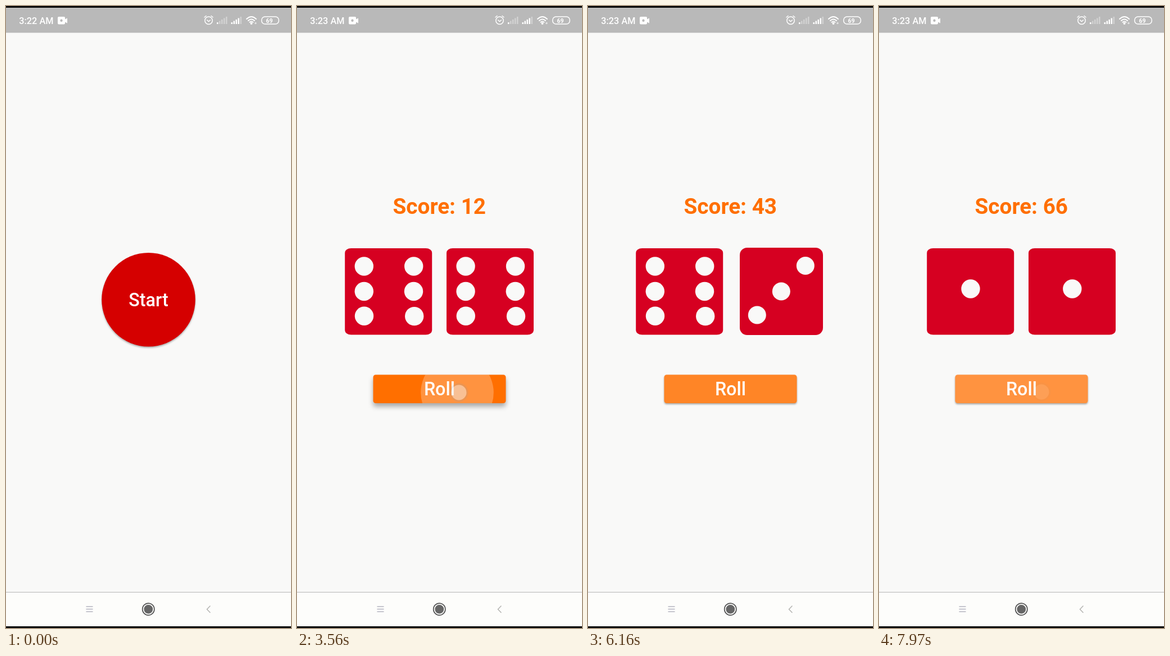
Recreate the animation shown at these times as an HTML page. Size 507 by 1104 pixels, loop 7990 ms.

```html
<!DOCTYPE html>
<html lang="en">
<head>
<meta charset="utf-8">
<title>Dice game</title>
<style>
  html, body { margin: 0; width: 100%; height: 100%; overflow: hidden; background: #f9f9f8; }
  svg { display: block; width: 507px; height: 1104px; font-family: Roboto, sans-serif; font-weight: 500; }
  .label { font-size: 32.3px; fill: #fff; text-anchor: middle; }
  .line { fill: none; stroke-width: 1.5; stroke-linecap: round; }
</style>
</head>
<body>
<svg viewBox="0 0 507 1104">
  <defs><clipPath id="buttonClip"><rect x="135.5" y="654.5" width="236" height="50.5" rx="4.5"/></clipPath></defs>
  <rect width="507" height="1104" fill="#f9f9f8"/>

  <g id="startPage">
    <circle id="startButton" cx="253.5" cy="521.3" r="83.3" fill="#d50000"/>
    <text class="label" x="253.5" y="532.5">Start</text>
  </g>

  <g id="gamePage">
    <rect y="47" width="507" height="994" fill="#f9f9f8"/>
    <text id="score" x="253.3" y="369" font-size="38.7" font-weight="700" fill="#ff6f00" text-anchor="middle"></text>
    <g id="leftDie"></g>
    <g id="rightDie" transform="translate(180.8 0)"></g>
    <rect id="rollButton" x="135.5" y="654.5" width="236" height="50.5" rx="4.5" fill="#ff6f00"/>
    <circle id="ripple" fill="#fff" clip-path="url(#buttonClip)"/>
    <text class="label" x="253.5" y="690.5">Roll</text>
  </g>

  <g id="touch">
    <circle r="16.5" fill="#a89a90" opacity=".32"/>
    <circle r="13.5" fill="#fff" opacity=".6"/>
  </g>

  <!-- status bar -->
  <rect width="507" height="47.5" fill="#b9b9b9"/>
  <rect width="507" height="3"/>
  <text id="clock" x="23.3" y="31.7" font-size="16.3" fill="#fff"></text>
  <g fill="#fff">
    <path d="M94 19h9q2 0 2 2v2.5l4-2v9l-4-2v2q0 2-2 2h-9q-2 0-2-2v-9.5q0-2 2-2z"/>
    <circle cx="98.5" cy="25.7" r="2.2" fill="#b9b9b9"/>
    <g id="signals"></g>
    <circle cx="436.5" cy="31" r="2"/>
    <circle cx="444" cy="30.5" r="1.7" opacity=".6"/>
    <text x="468.5" y="29.5" font-size="10.5" font-weight="700" text-anchor="middle">69</text>
  </g>
  <g class="line" stroke="#fff">
    <circle cx="360.5" cy="25.7" r="6.7"/>
    <path d="M357.5 25l3 2.5 3-2.5M353 20l3-2.5M368 20l-3-2.5"/>
    <path d="M428 23q8.5-8 17 0M431 26q5.5-5 11 0M433.5 28.800q3-2.5 6 0" stroke-width="2"/>
    <rect x="454.7" y="19" width="30.6" height="13" rx="6"/>
  </g>

  <!-- navigation bar -->
  <rect y="1041" width="507" height="60" fill="#fdfdfb"/>
  <rect y="1040" width="507" height="1" fill="#b5b5b5"/>
  <rect y="1101" width="507" height="3"/>
  <path class="line" stroke="#b4b4c0" d="M143 1066h11M143 1070.5h11M143 1075h11"/>
  <circle cx="253.3" cy="1070.7" r="10.6" fill="none" stroke="#555" stroke-width="1.7"/>
  <circle cx="253.3" cy="1070.7" r="7.9" fill="#666"/>
  <path class="line" stroke="#b4b4b0" d="M363 1065l-5.5 5.7 5.5 5.7"/>
</svg>

<script>
const LOOP = 7990, UP = 140;
const $ = id => document.getElementById(id);
const clamp = v => Math.max(0, Math.min(1, v));
const span = (t, from, to) => clamp((t - from) / (to - from));

// [touch down time, x, y, left die, right die]
const rolls = [
  [3350, 288, 686, 6, 6], [4250, 288, 687, 2, 6], [4820, 289, 686, 2, 2],
  [5280, 290, 686, 4, 6], [5780, 291, 685, 6, 3], [6240, 292, 685, 5, 4],
  [6740, 293, 685, 1, 3], [7220, 295, 685, 3, 5], [7680, 289, 685, 1, 1]
];

function die(n) {
  if (!n) return '';
  const wide = n === 1 || n === 6;
  const body = wide
    ? '<rect x="85.2" y="430" width="155" height="153.5" rx="11" ry="8"'
    : '<rect x="89.2" y="429" width="148" height="155" rx="13"';
  const pips = [];
  if (n === 1) pips.push([0, 502]);
  else if (n === 6) {
    pips.push([-43.7, 462], [-43.7, 506.5], [-43.5, 550.2]);
    pips.push([44.7, 462], [44.5, 506.5], [45.7, 550.6]);
  } else {
    pips.push([43, 461], [-43, 548.5]);
    if (n > 3) pips.push([-43, 461], [43, 548.5]);
    if (n % 2) pips.push([0, 506.5]);
  }
  return body + ' fill="#d60021"/>' + pips.map(([x, y]) =>
    `<circle cx="${163 + x}" cy="${y}" r="${wide ? 16.7 : 16}" fill="#f9f9f8"/>`).join('');
}

function lift(el, amount) {
  el.style.filter = `drop-shadow(0 ${2 + 5.5 * amount}px ${1.5 + 3.5 * amount}px rgba(0,0,0,.32))`;
}

function showTouch(x, y, age, up) {
  $('touch').setAttribute('transform', `translate(${x} ${y})`);
  $('touch').setAttribute('opacity', age < 0 ? 0 : 1 - span(age, up + 20, up + 180));
}

function draw(t) {
  const slide = 1 - (1 - span(t, 2650, 2890)) ** 3;
  $('startPage').setAttribute('transform', `translate(${-120 * slide} 0)`);
  $('gamePage').setAttribute('transform', `translate(${507 * (1 - slide)} 0)`);
  $('clock').textContent = t < 2890 ? '3:22 AM' : '3:23 AM';

  let score = 0, left = 1, right = 1, tap = null;
  for (const roll of rolls) {
    const age = t - roll[0];
    if (age < 0) break;
    tap = roll;
    if (age < UP) continue;
    score += roll[3] + roll[4];
    left = age < UP + 60 ? 0 : roll[3];
    right = roll[4];
  }
  $('score').textContent = 'Score: ' + score;
  $('leftDie').innerHTML = die(left);
  $('rightDie').innerHTML = die(right);

  const [down, x, y] = tap || [LOOP, 0, 0];
  const age = t - down;
  const ripple = $('ripple');
  ripple.setAttribute('cx', x - 3);
  ripple.setAttribute('cy', y);
  ripple.setAttribute('r', 165 * span(age, 140, 300) ** 1.15);
  ripple.setAttribute('opacity', .25 * (1 - span(age, 300, 500)));
  lift($('rollButton'), span(age, 60, 160) * (1 - span(age, 190, 280)));
  lift($('startButton'), span(t, 2560, 2640));
  if (tap) showTouch(x, y, age, UP);
  else showTouch(262, 530, t - 2550, 80);
}

$('signals').innerHTML = [375, 400.5].map((x, card) => [0, 1, 2, 3, 4].map(i =>
  `<rect x="${x + i * 4}" y="${29 - i * 2.5}" width="2.5" height="${3 + i * 2.5}"
    opacity="${i < (card ? 4 : 1) ? 1 : .35}"/>`).join('')).join('');

const begin = performance.now();
function frame() {
  draw((performance.now() - begin) % LOOP);
  requestAnimationFrame(frame);
}
frame();
</script>
</body>
</html>
```
